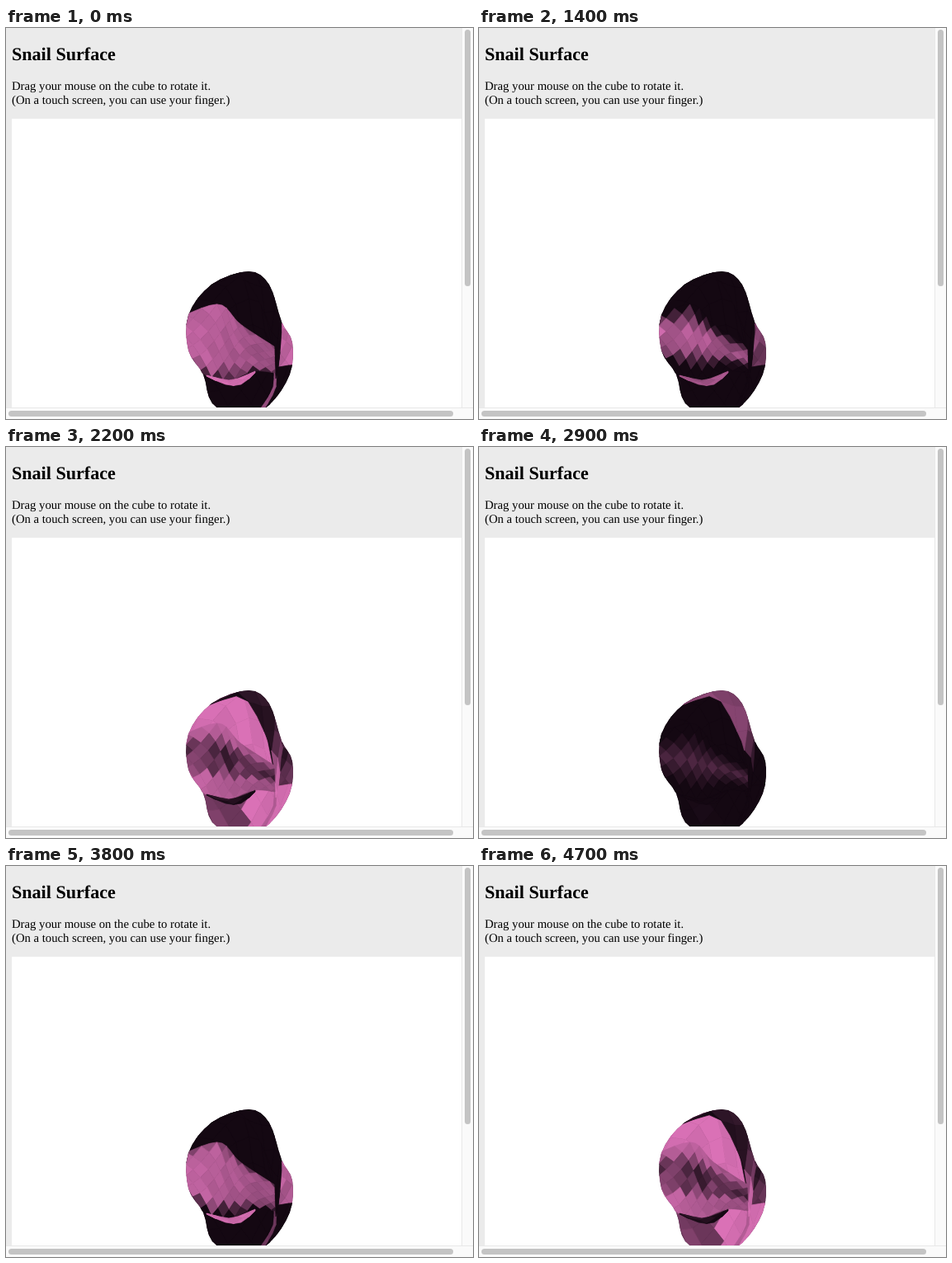
An HTML page with a canvas for the animation above (4.8 s loop, 566 by 474 pixels).

```html
<!DOCTYPE html>
<html lang="en">
<head>
<meta charset="utf-8">
<title>Snail Surface</title>
<style>
  html, body { margin: 0; width: 100%; height: 100%; overflow: hidden; background: #ebebeb; }
  .stage { position: absolute; left: 0; top: 0; width: 566px; height: 474px; overflow: hidden; }
  canvas, svg, .bar, .thumb { position: absolute; }
  canvas { left: 7px; top: 110px; background: #fff; }
  svg { left: 0; top: 0; }
  text { font-family: "Liberation Serif", "Times New Roman", serif; font-size: 14.7px; fill: #000; text-rendering: geometricPrecision; }
  .title { font-size: 22.1px; font-weight: bold; }
  .bar { background: #fafafa; box-sizing: border-box; }
  .right { left: 552px; top: 0; width: 14px; height: 474px; border-left: 1px solid #e8e8e8; }
  .bottom { left: 0; top: 460px; width: 566px; height: 14px; border-top: 1px solid #e8e8e8; }
  .thumb { background: #c4c4c4; border-radius: 4px; }
  .right .thumb { left: 3px; top: 2px; width: 7px; height: 311px; }
  .bottom .thumb { left: 3px; top: 3px; width: 539px; height: 7px; }
</style>
</head>
<body>
<div class="stage">
  <canvas width="545" height="350"></canvas>
  <svg width="566" height="110">
    <text class="title" x="7" y="38.7">Snail Surface</text>
    <text x="7" y="75.2">Drag your mouse on the cube to rotate it.</text>
    <text x="7" y="91.8">(On a touch screen, you can use your finger.)</text>
  </svg>
  <div class="bar right"><div class="thumb"></div></div>
  <div class="bar bottom"><div class="thumb"></div></div>
</div>
<script>
const ctx = document.querySelector('canvas').getContext('2d');
const LOOP = 4800, STEP = 100, TURN = 1250;
const DARK = [20, 8, 18], PINK = [218, 113, 182];

const mix = (a, b, k) => a + (b - a) * k;
const clamp = (x, lo, hi) => Math.max(lo, Math.min(hi, x));
const facing = (time, peak) => Math.max(0, Math.cos((time - peak) / TURN * 2 * Math.PI));

// Smooth curve through a few key points, as a function of u in 0..1.
function curve(text, closed = false) {
  const p = text.split(' ').map(s => s.split(',').map(Number));
  const n = p.length, spans = closed ? n : n - 1;
  const key = i => closed ? p[(i + n) % n] : p[clamp(i, 0, n - 1)];
  return u => {
    const x = clamp(u, 0, 1) * spans, i = Math.min(Math.floor(x), spans - 1), t = x - i;
    const [a, b, c, d] = [-1, 0, 1, 2].map(k => key(i + k));
    return [0, 1].map(k => b[k] + t / 2 * (c[k] - a[k]
      + t * (2 * a[k] - 5 * b[k] + 4 * c[k] - d[k] + t * (3 * (b[k] - c[k]) + d[k] - a[k]))));
  };
}

function noise(i, j, seed) {
  const n = Math.sin(i * 12.99 + j * 78.23 + seed * 37.7) * 43758.55;
  return (n - Math.floor(n)) * 2 - 1;
}

// A patch spans two curves and is tiled with diamond facets.
const patches = [];
function patch(from, to, cols, rows, jitter, light) {
  const a = curve(from), b = curve(to), seed = patches.length, facets = [];
  const at = (i, j) => {
    const p = a(i / cols), q = b(i / cols), v = clamp(j / rows, 0, 1);
    return [mix(p[0], q[0], v), mix(p[1], q[1], v)];
  };
  for (let j = 0; j <= rows; j++) {
    for (let i = j % 2; i <= cols; i += 2) {
      facets.push({
        shape: [at(i - 1, j), at(i, j - 1), at(i + 1, j), at(i, j + 1)],
        u: i / cols, v: j / rows,
        shift: noise(i, j, seed) * jitter,
        tint: 1 - Math.abs(noise(j, i, seed + 5)) * jitter / 250
      });
    }
  }
  patches.push({ facets, light });
}

// right lobe, inner and lower part
patch('334,358 352,370 352,409', '334,360 333,385 330,412', 6, 3, 50,
  t => facing(t, -40) * 1.05);
patch('326,418 330,411 354,408', '316,462 335,460 354,425', 4, 2, 15,
  t => facing(t, 870) * 1.3);
// lower body
patch('236,416 270,428 303,414 328,414', '236,440 262,472 300,474 320,457', 8, 3, 18,
  (t, u) => facing(t, u < 0.6 ? 725 : 870) * 1.3);
// thin fold
patch('326,402 327,435 313,462', '324,402 324,435 308,462', 6, 1, 20,
  t => facing(t, 1070));
// upper shell
patch('214,352 236,312 287,298 313,344 327,410', '214,362 258,344 290,370 326,404', 10, 3, 18,
  t => facing(t, 870) * 1.15);
// rim
patch('244,310 292,291 326,315 334,358 330,412', '246,313 287,303 313,345 323,375 327,425', 10, 2, 12,
  (t, u) => facing(t, 650 + 200 * u ** 6) * 1.8);
// faceted band
patch('212,350 258,335 284,359 325,386', '214,398 242,421 270,427 300,416 326,418', 16, 8, 35,
  (t, u, v) => {
    const front = facing(t, 1070 - 90 * v + 180 * Math.sin(Math.PI * v)) * 1.5;
    const back = facing(t, 400) * 0.3 * Math.max(0, 1 - Math.abs(v - 0.5) * 3);
    return Math.min(0.95, front) * (1 - 0.25 * u) + back;
  });
// lip under the band
patch('243,421 270,427 288,422 302,416', '243,422 266,432 285,432 302,418', 6, 2, 20,
  t => facing(t, 0));

const rim = curve('294,295 319,311 334,356 347,381 344,420 319,457 285,474 250,455 ' +
  '239,420 221,391 221,348 249,311', true);
const outline = Array.from({ length: 48 }, (_, i) => rim(i / 48));

function trace(shape) {
  ctx.beginPath();
  shape.forEach(p => ctx.lineTo(p[0], p[1]));
  ctx.closePath();
}

function shade(k) {
  return `rgb(${DARK.map((d, i) => Math.round(mix(d, PINK[i], clamp(k, 0, 1))))})`;
}

function draw(time) {
  ctx.setTransform(1, 0, 0, 1, 0, 0);
  ctx.clearRect(0, 0, 545, 350);
  ctx.translate(-7, -110);
  ctx.save();
  trace(outline);
  ctx.clip();
  ctx.fillStyle = shade(0);
  ctx.fill();
  ctx.lineWidth = 0.7;
  for (const { facets, light } of patches) {
    for (const f of facets) {
      const k = Math.min(1, light(time - f.shift, f.u, f.v)) * f.tint;
      ctx.fillStyle = ctx.strokeStyle = shade(k);
      trace(f.shape);
      ctx.fill();
      ctx.stroke();
    }
  }
  ctx.restore();
}

const start = performance.now();
let shown = -1;
function tick() {
  const t = Math.floor((performance.now() - start) % LOOP / STEP) * STEP;
  if (t !== shown) draw(shown = t);
  requestAnimationFrame(tick);
}
tick();
</script>
</body>
</html>
```
